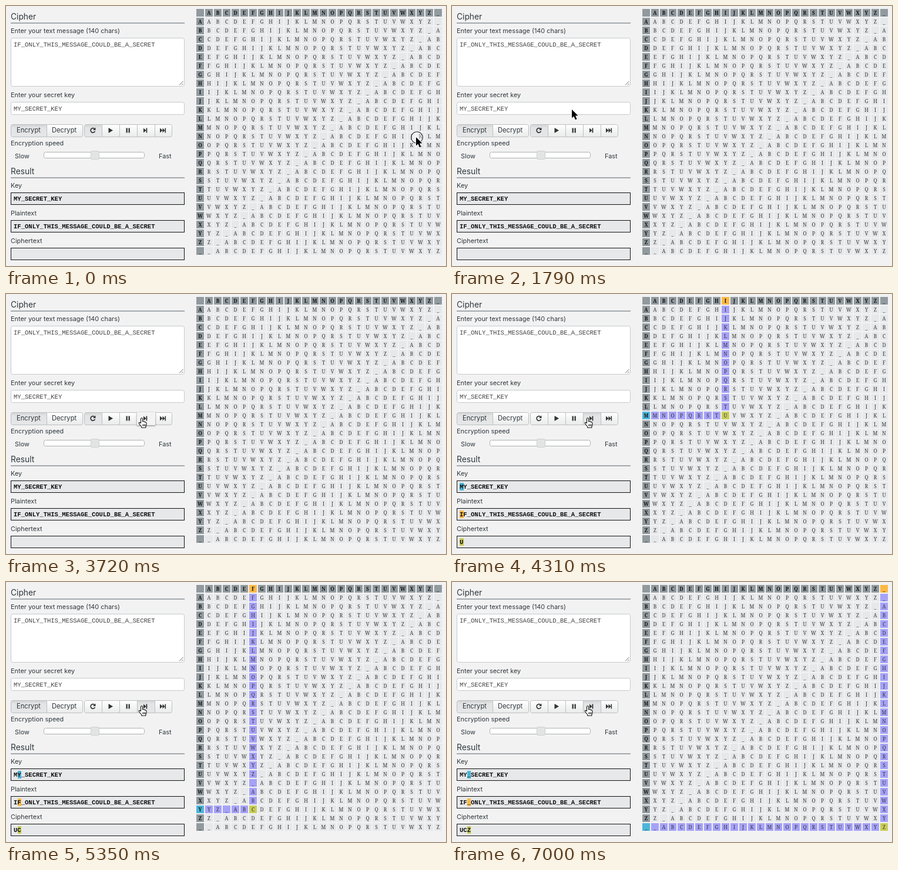
Animation of 749x442 px, one loop 8 s. Source, as an HTML page:

```html
<!DOCTYPE html>
<html lang="en">
<head>
<meta charset="utf-8">
<title>Cipher table</title>
<style>
  html, body { margin: 0; width: 100%; height: 100%; overflow: hidden; background: #f2f2f2; }
  svg { display: block; }
  .ui { font: 10.9px Inter, sans-serif; fill: #2f373d; }
  .title { font-size: 13.8px; }
  .button { font-size: 11.2px; }
  .mono { font: 10.55px "Liberation Mono", monospace; fill: #444; }
  .result { font-weight: bold; fill: #111; }
  .cell { font: 8.4px "Noto Serif", serif; fill: #333; text-anchor: middle; }
  .head { font-weight: bold; fill: #111; }
  .field { fill: #fff; stroke: #c6c9cb; }
  .box { fill: #e6e8ea; stroke: #111; }
  .edge { fill: none; stroke: #bdbfc0; }
  .hover { fill: #f3f3f3; filter: drop-shadow(.5px 1px 1.5px rgba(0, 0, 0, .5)); }
  .icon { fill: #333; }
  [class*="anim-"] { animation: 8s step-end infinite; }
</style>
</head>
<body>
<svg width="749" height="442" viewBox="0 0 749 442">
  <defs>
    <linearGradient id="face" x2="0" y2="1">
      <stop stop-color="#fff"/><stop offset="1" stop-color="#e9eaea"/>
    </linearGradient>
    <linearGradient id="inset" x2="0" y2="1">
      <stop stop-color="#d2d4d5"/><stop offset=".25" stop-color="#e3e4e5"/><stop offset="1" stop-color="#e5e6e7"/>
    </linearGradient>
  </defs>
  <g class="ui">
    <text class="title" x="8" y="23">Cipher</text>
    <text x="8" y="46">Enter your text message (140 chars)</text>
    <text x="8" y="155">Enter your secret key</text>
    <text x="8" y="237">Encryption speed</text>
    <text x="15" y="259">Slow</text>
    <text x="260" y="259">Fast</text>
    <text class="title" x="8" y="286">Result</text>
    <text x="8" y="309">Key</text>
    <text x="8" y="356">Plaintext</text>
    <text x="8" y="403">Ciphertext</text>
  </g>
  <path d="M8 29.5H304M8 292.5H304" transform="translate(0 -.5)" stroke="#59636a"/>

  <rect class="field" x="8.5" y="54.5" width="295" height="82" rx="3"/>
  <path d="M295 134.5l6.5-6.5M299 134.5l2.5-2.5" stroke="#666" fill="none"/>
  <rect class="field" x="8.5" y="163.5" width="295" height="21" rx="3"/>
  <g class="mono">
    <text x="13" y="69">IF_ONLY_THIS_MESSAGE_COULD_BE_A_SECRET</text>
    <text x="13" y="178">MY_SECRET_KEY</text>
  </g>

  <rect x="8.5" y="201.5" width="122" height="21" rx="3" fill="url(#face)"/>
  <rect x="9" y="202" width="60" height="20" rx="2" fill="url(#inset)"/>
  <path class="edge" d="M69.5 202V222"/>
  <rect class="edge" x="8.5" y="201.5" width="122" height="21" rx="3"/>
  <rect x="133.5" y="201.5" width="149" height="21" rx="3" fill="url(#face)"/>
  <rect class="anim-reset" x="134" y="202" width="29" height="20" rx="2" fill="url(#inset)"/>
  <path class="edge" d="M163.5 202V222M193.5 202V222M223.5 202V222M253.5 202V222"/>
  <rect class="edge" x="133.5" y="201.5" width="149" height="21" rx="3"/>
  <rect class="hover anim-hover" x="223" y="201" width="31" height="22"/>
  <rect class="anim-step" x="223.5" y="201.5" width="30" height="21" fill="url(#inset)" stroke="#bdbfc0"/>
  <g class="ui">
    <text class="button" x="18" y="215">Encrypt</text>
    <text class="button" x="78" y="215">Decrypt</text>
  </g>
  <g class="icon">
    <path d="M151 209.2a3.8 3.8 0 1 0 .5 3.6" fill="none" stroke="#333" stroke-width="1.7"/>
    <path d="M152.5 206.5v4.5h-4.5z"/>
    <path d="M174.5 207l7.5 4.5-7.5 4.5z"/>
    <path d="M204.5 207.5h2.3v8h-2.3zM208.5 207.5h2.3v8h-2.3z"/>
    <path d="M234 207.5l4.5 4-4.5 4zM238.5 207.5h1.8v8h-1.8z"/>
    <path d="M262 207.5l4.5 4-4.5 4zM266.5 207.5l4 4-4 4zM270.5 207.5h1.6v8h-1.6z"/>
  </g>

  <rect x="64.5" y="248.5" width="171" height="10" rx="3" fill="#fff" stroke="#aeb0b1"/>
  <rect x="144.5" y="246.5" width="14" height="14" rx="2" fill="#e2e3e3" stroke="#cdcfd0"/>

  <rect class="box" x="8.5" y="317.5" width="295" height="20"/>
  <rect class="box" x="8.5" y="364.5" width="295" height="20"/>
  <rect class="box" x="8.5" y="411.5" width="295" height="20"/>

  <g id="cells" shape-rendering="crispEdges"></g>
  <g id="marks" shape-rendering="crispEdges"></g>
  <g id="letters"></g>

  <g class="mono result" id="output">
    <text x="13" y="331">MY_SECRET_KEY</text>
    <text x="13" y="378">IF_ONLY_THIS_MESSAGE_COULD_BE_A_SECRET</text>
  </g>

  <circle class="anim-ring" cx="699.5" cy="223.5" r="9.8" fill="#fff" fill-opacity=".35" stroke="#222" stroke-width="1.1"/>
  <g class="anim-arrow">
    <path d="M0 0V14.5L3.4 11.4 6 17.3 8.6 16.2 6 10.4H10.6Z" stroke="#fff" stroke-width="1.6" paint-order="stroke"/>
  </g>
  <g class="anim-hand">
    <path transform="translate(225.5 210)" fill="#fff" stroke="#111" stroke-width="1.1" stroke-linejoin="round"
      d="M4 9.5V2.2a1.5 1.5 0 0 1 3 0V6.8q1.5-.8 2.5.5 1.6-.6 2.3.8 1.7-.2 1.7 1.6V12q0 2-1.2 3.4V17.3H5.3V15.5L1.6 11.3Q.2 9.2 1.2 8.5 2.3 7.9 4 10M7.5 11.5v3M9.5 11.5v3M11.4 11.5v3"/>
  </g>
</svg>
<script>
const ALPHABET = "ABCDEFGHIJKLMNOPQRSTUVWXYZ_";
const SIZE = ALPHABET.length, PITCH = 15, CELL = 13, CHAR = 6.33, LOOP = 8000;
const BLUE = "#4db5d9", ORANGE = "#fdb945", PURPLE = "#a6a2f8", OLIVE = "#c9cd58";
const byId = id => document.getElementById(id);

function add(parent, tag, attrs, text = "") {
  const node = document.createElementNS("http://www.w3.org/2000/svg", tag);
  for (const key in attrs) node.setAttribute(key, attrs[key]);
  node.textContent = text;
  return parent.appendChild(node);
}

const cellX = col => 324 + col * PITCH;
const cellY = row => 5 + row * PITCH;
const paint = (parent, col, row, fill) =>
  add(parent, "rect", { x: cellX(col), y: cellY(row), width: CELL, height: CELL, fill });

// Row and column 0 hold the headers.
for (let row = 0; row <= SIZE; row++) {
  for (let col = 0; col <= SIZE; col++) {
    const head = !row || !col;
    paint(byId("cells"), col, row, head ? "#919a9f" : "#e6e8ea");
    if (!row && !col) continue;
    const index = row + col - (head ? 1 : 2);
    add(byId("letters"), "text", {
      x: cellX(col) + 6.5, y: cellY(row) + 9.5, class: head ? "cell head" : "cell"
    }, ALPHABET[index % SIZE]);
  }
}

const css = [];
// Each frame is [time in ms, declarations]; the last one holds until the loop restarts.
function steps(name, frames) {
  const held = [...frames, [LOOP, frames.at(-1)[1]]];
  const body = held.map(([ms, rule]) => `${ms / LOOP * 100}% { ${rule} }`).join(" ");
  css.push(`@keyframes ${name} { ${body} } .anim-${name} { animation-name: ${name}; }`);
}
const fade = (name, frames) => steps(name, frames.map(([ms, value]) => [ms, `opacity: ${value}`]));

const moves = [[4160, 4310], [5200, 5350], [6850, 7000]];
moves.forEach(([start, full], i) => {
  const col = ALPHABET.indexOf("IF_"[i]) + 1, row = ALPHABET.indexOf("MY_"[i]) + 1;
  const mark = add(byId("marks"), "g", { class: `anim-mark${i}` });
  paint(mark, col, 0, ORANGE);
  paint(mark, 0, row, BLUE);
  for (let r = 1; r < row; r++) paint(mark, col, r, PURPLE);
  for (let c = 1; c < col; c++) paint(mark, c, row, PURPLE);
  paint(mark, col, row, OLIVE);
  [BLUE, ORANGE, OLIVE].forEach((fill, line) =>
    add(mark, "rect", { x: 13.4 + i * CHAR, y: 321 + line * 47, width: CHAR, height: 13, fill }));
  add(byId("output"), "text", { x: 13 + i * CHAR, y: 425, class: `anim-cipher${i}` },
    ALPHABET[(row + col - 2) % SIZE]);

  const shown = [[0, 0], [start, .5], [full, 1]];
  const next = moves[i + 1];
  fade(`cipher${i}`, shown);
  fade(`mark${i}`, next ? [...shown, [next[0], .5], [next[1], 0]] : shown);
});

fade("ring", [[0, 1], [150, 0]]);
fade("reset", [[0, 1], [4160, .5], [4310, 0]]);
fade("step", [[0, 0], [4160, .5], [4310, 1]]);
fade("hover", [[0, 0], [3120, .25], [3420, .5], [3570, .75], [3720, 1], [4160, .5], [4310, 0]]);
fade("hand", [[0, 0], [3120, 1]]);

const path = [
  [0, 698, 223], [450, 690, 218], [600, 600, 180], [740, 400, 112], [890, 255, 79],
  [1040, 214, 92], [1190, 210, 106], [1340, 206, 130], [1490, 204, 149],
  [1640, 203, 158], [1790, 204, 176], [1930, 206, 193], [2080, 208, 203],
  [2380, 214, 205], [2530, 223, 208], [2680, 226, 209], [2820, 227, 209]
];
steps("arrow", [
  ...path.map(([ms, x, y]) => [ms, `transform: translate(${x}px, ${y}px); visibility: visible`]),
  [3120, "visibility: hidden"]
]);

document.head.appendChild(document.createElement("style")).textContent = css.join("\n");
</script>
</body>
</html>
```
